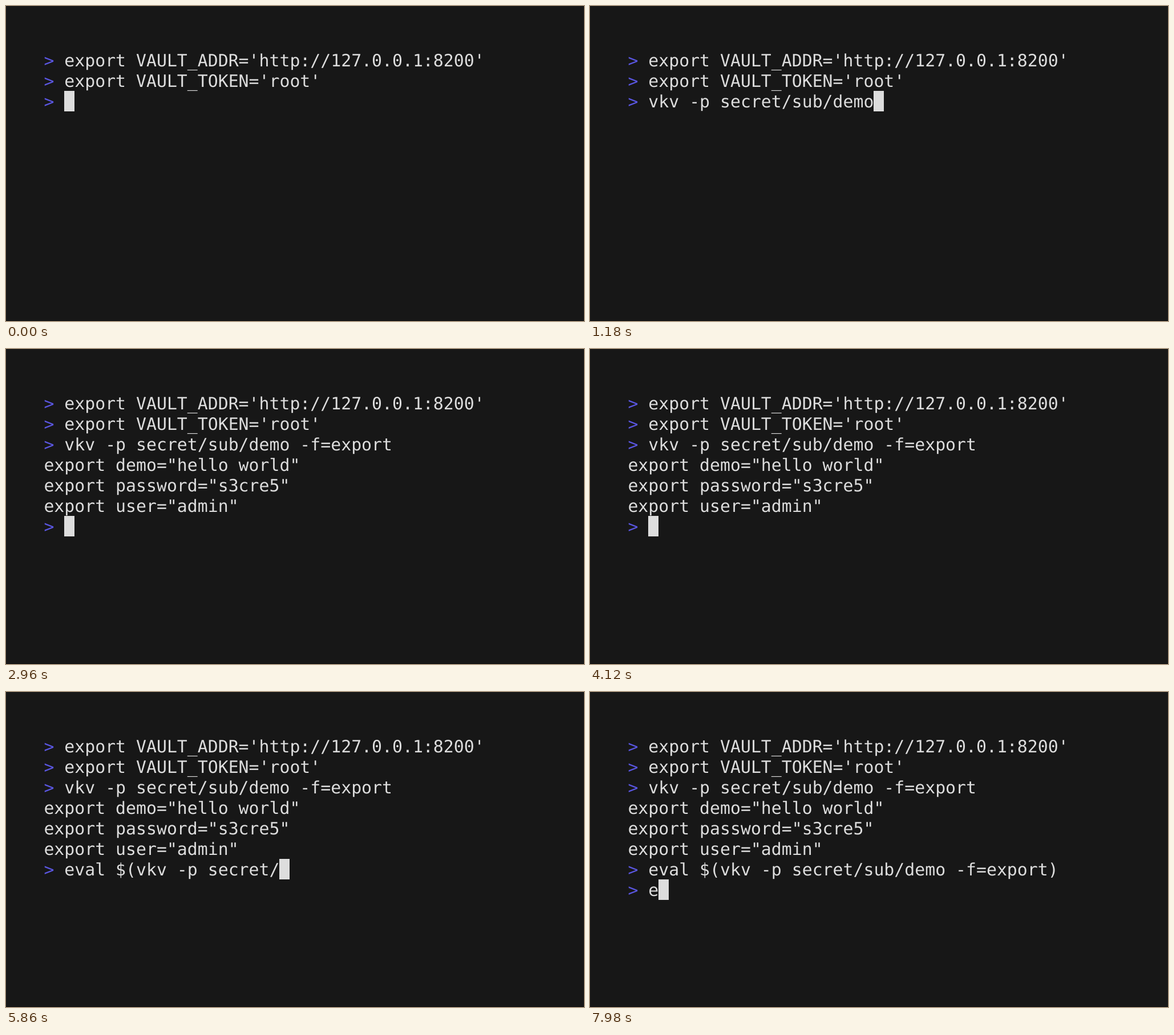
Animation, 1013 px wide and 553 px high, one loop 8000 ms. Source, as an HTML page:

```html
<!DOCTYPE html>
<html lang="en">
<head>
<meta charset="utf-8">
<title>Terminal session</title>
<style>
  html, body { margin: 0; width: 100%; height: 100%; overflow: hidden; background: #171717; }
  svg { display: block; width: 1013px; height: 553px; }
  text {
    font-family: "DejaVu Sans Mono", monospace;
    font-size: 29.83px;
    fill: #ddd;
    white-space: pre;
    text-rendering: geometricPrecision;
  }
  .prompt { fill: #5a56e0; }
</style>
</head>
<body>
<svg viewBox="0 0 1013 553" xmlns="http://www.w3.org/2000/svg">
  <rect width="1013" height="553" fill="#171717"/>
  <rect y="552" width="1013" height="1" fill="#0e0e0e"/>
  <g id="lines"></g>
  <rect id="cursor" width="18" height="36" fill="#ddd"/>
</svg>
<script>
const LOOP = 8000, TICK = 20, BLINK = 580;
const LEFT = 66.4, TOP = 77, CELL = 17.96, ROW = 36, BASELINE = 28.8;
const SVG_NS = "http://www.w3.org/2000/svg";

// Each command is typed from `start`, one key every `pace` ms; `late` lists delayed keys.
const commands = [
  { text: "export VAULT_ADDR='http://127.0.0.1:8200'", done: 0 },
  { text: "export VAULT_TOKEN='root'", done: 0 },
  {
    text: "vkv -p secret/sub/demo -f=export",
    shown: 0, start: 45, pace: 53.8, late: { 32: 1740 }, enter: 1780, done: 1800,
    output: ['export demo="hello world"', 'export password="s3cre5"', 'export user="admin"'],
  },
  {
    text: "eval $(vkv -p secret/sub/demo -f=export)",
    shown: 1800, start: 4779, pace: 54, late: { 22: 5940 }, enter: 6940, done: 6980,
  },
  { text: "e", shown: 7000, start: 7980, pace: 54 },
];

function keyTime({ start, pace, late = {} }, n) {
  return late[n] ?? Math.ceil((start + (n - 1) * pace) / TICK) * TICK;
}

function typedCount(command, t) {
  let n = 0;
  while (n < command.text.length && t >= keyTime(command, n + 1)) n++;
  return n;
}

function screenAt(t) {
  const rows = [];
  for (const command of commands) {
    const { text, shown, enter, done, output = [] } = command;
    if (t >= done) {
      rows.push({ prompt: true, text }, ...output.map(line => ({ text: line })));
      continue;
    }
    const count = typedCount(command, t);
    rows.push({ prompt: true, text: text.slice(0, count) });
    if (t >= enter) return { rows, row: rows.length, column: 0, visible: true };
    const visible = count > 0 || Math.floor((t - shown) / BLINK) % 2 === 0;
    return { rows, row: rows.length - 1, column: count + 2, visible };
  }
}

const lines = document.getElementById("lines");
const cursor = document.getElementById("cursor");

function make(tag, parent, attributes = {}) {
  const node = document.createElementNS(SVG_NS, tag);
  for (const name in attributes) node.setAttribute(name, attributes[name]);
  return parent.appendChild(node);
}

const slots = Array.from({ length: 8 }, (_, i) => {
  const line = make("text", lines, { x: LEFT, y: TOP + i * ROW + BASELINE });
  return { prompt: make("tspan", line, { class: "prompt" }), body: make("tspan", line) };
});

function setText(node, value) {
  if (node.textContent !== value) node.textContent = value;
}

function render(t) {
  const { rows, row, column, visible } = screenAt(t);
  slots.forEach((slot, i) => {
    setText(slot.prompt, rows[i]?.prompt ? "> " : "");
    setText(slot.body, rows[i]?.text ?? "");
  });
  cursor.setAttribute("x", Math.round(LEFT + column * CELL));
  cursor.setAttribute("y", TOP + row * ROW);
  cursor.setAttribute("visibility", visible ? "visible" : "hidden");
}

const origin = performance.now();
function frame() {
  render((performance.now() - origin) % LOOP);
  requestAnimationFrame(frame);
}
frame();
</script>
</body>
</html>
```
